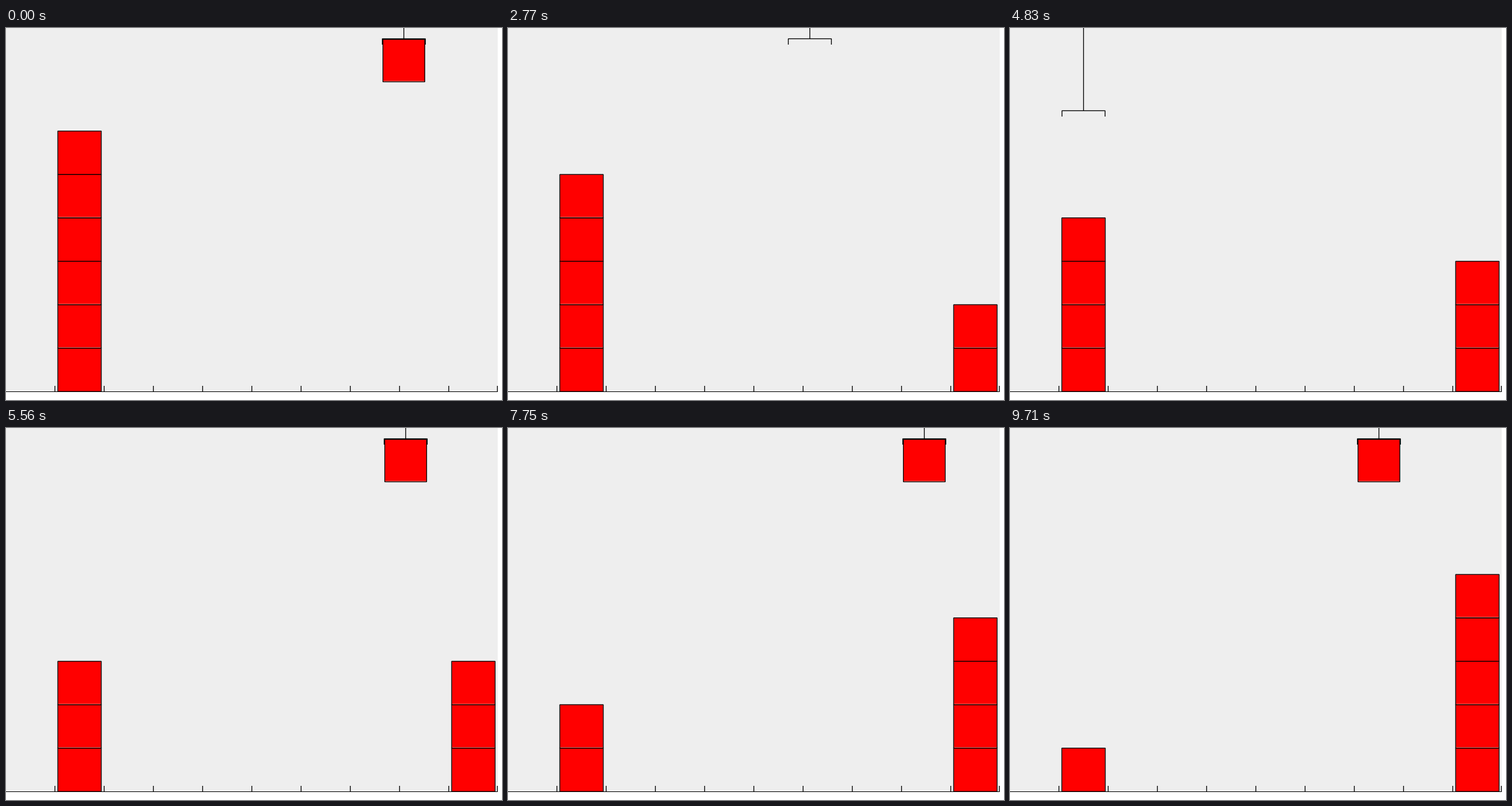
A matplotlib script that plays this animation: 806x605 px, repeating every 9.81 s.

```python
import matplotlib.pyplot as plt
import numpy as np
from matplotlib.animation import FuncAnimation
from matplotlib.patches import Rectangle

W, H, DPI = 806, 605, 64
FRAMES, INTERVAL = 327, 30
LEFT, RIGHT, REST = 119, 759, 17
SIZE, FLOOR = 70.6, 591
PX = 72 / DPI
LINE = 1.3 * PX

plt.rcParams["path.snap"] = False
fig = plt.figure(figsize=(W / DPI, H / DPI), dpi=DPI, facecolor="white")
ax = fig.add_axes([0, 0, 1, 1])
ax.set_xlim(0, W)
ax.set_ylim(H, 0)
ax.axis("off")


def top(n):
    """Height at which the hand meets the top of a stack of n blocks."""
    return FLOOR - SIZE * n


def line(xs, ys, width=LINE, color="black", z=3):
    return ax.plot(xs, ys, color=color, lw=width, zorder=z,
                   solid_capstyle="butt", solid_joinstyle="miter")[0]


def block(x, y, w, h, z):
    return ax.add_patch(Rectangle((x, y), w, h, fc="#ff0000", ec="black",
                                  lw=LINE, joinstyle="miter", zorder=z))


def stack(center):
    """Six blocks from the floor up, each with its faint seam if it has one."""
    x = center + 0.5 - SIZE / 2
    blocks = []
    for n in range(6):
        bottom = FLOOR + 0.2 - SIZE * n
        parts = [block(x, bottom - SIZE, SIZE, SIZE, 2)]
        if n in (1, 2, 4):
            seam = bottom - 1.1
            parts.append(line([x + 1, x + SIZE - 1], [seam, seam],
                              0.6 * PX, "#ffb0a0"))
        blocks.append(parts)
    return blocks


def show_stack(blocks, count):
    for n, parts in enumerate(blocks):
        for part in parts:
            part.set_visible(n < count)


# Route of the hand: drop on the right, pick on the left, again and again
route = [(646, REST)]
for k in range(5):
    for x, y in ((RIGHT, top(k + 1)), (LEFT, top(6 - k))):
        route += [(x, REST), (x, y), (x, REST)]
route.append((RIGHT, REST))
route = np.array(route)
legs = np.abs(np.diff(route, axis=0)).sum(axis=1)
dist = np.concatenate([[0], np.cumsum(legs)])
drops, picks = dist[2::6], dist[5::6]

# Distance travelled at given frames, with short stalls
PACE = [(0, 0), (33, 1521), (40, 1676), (66, 2614), (68, 2614), (69, 2740),
        (92, 3835), (102, 4199), (125, 5177), (135, 5690), (185, 7766),
        (188, 7766), (199, 8192), (202, 8192), (235, 9488), (258, 10380),
        (301, 12051), (323, 12891), (326, 12891)]
pace_frames, pace_dist = zip(*PACE)

# Scene
ax.add_patch(Rectangle((0, 0), 799, 592, fc="#eeeeee", ec="none", zorder=0))
line([0, 799], [591.5, 591.5], PX)
for i in range(10):
    x = min(79.5 + 80 * i, 798.5)
    line([x, x], [582, 591.5])

left_stack = stack(LEFT)
right_stack = stack(RIGHT)
cargo = block(0, 0, 68, 69, 4)
cargo_seam = line([], [], 0.6 * PX, "#ffb0a0", 5)
cable = line([], [], z=6)
claw = line([], [], z=6)


def update(frame):
    s = np.interp(frame, pace_frames, pace_dist)
    x = round(float(np.interp(s, dist, route[:, 0]))) + 0.5
    y = round(float(np.interp(s, dist, route[:, 1]))) + 0.5
    dropped = int((drops <= s).sum())
    picked = int((picks <= s).sum())

    show_stack(left_stack, 6 - picked)
    show_stack(right_stack, dropped)

    loaded = picked == dropped
    cargo.set_visible(loaded)
    cargo.set_xy((x - 34, y + 1))
    cargo_seam.set_visible(loaded)
    cargo_seam.set_data([x - 33, x + 33], [y + 69, y + 69])

    cable.set_data([x, x], [0, y])
    claw.set_data([x - 35, x - 35, x + 35, x + 35], [y + 9.5, y, y, y + 9.5])
    return []


anim = FuncAnimation(fig, update, frames=FRAMES, interval=INTERVAL,
                     init_func=lambda: update(0), repeat=True, repeat_delay=0)
plt.show()
```
